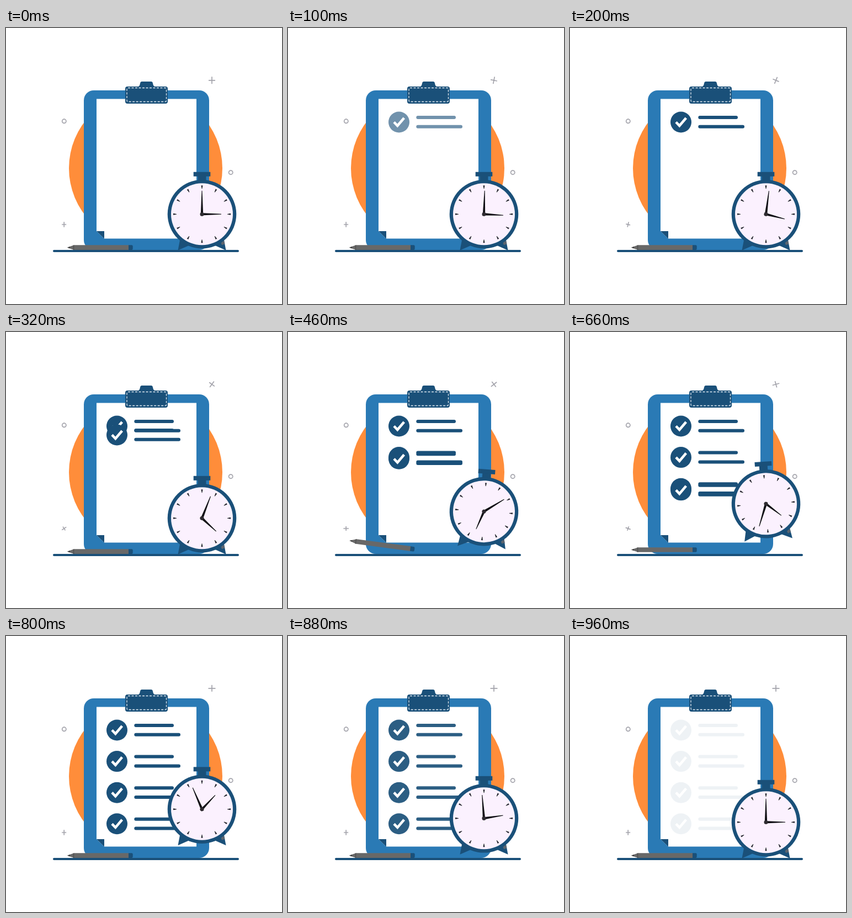
Animation of 500 by 500 pixels, one loop 0.98 s. Source, as an HTML page:

```html
<!DOCTYPE html>
<html lang="en">
<head>
<meta charset="utf-8">
<title>Checklist and clock</title>
<style>
  html, body { margin: 0; width: 100%; height: 100%; overflow: hidden; background: #fff; }
  svg { display: block; width: 100vw; height: 100vh; }
  .dark { fill: #1a5079; }
  .blue { fill: #2a7ab5; }
  .bar { stroke: #1a5079; stroke-width: 6; stroke-linecap: round; }
  .deco { fill: none; stroke: #a3a3ab; stroke-width: 1.7; }
</style>
</head>
<body>
<svg viewBox="0 0 500 500">
  <defs>
    <g id="task">
      <circle class="dark" cx="201" cy="170.5" r="19"/>
      <path d="M192 170.5l6.3 6.6L210.3 163" fill="none" stroke="#fff" stroke-width="4.6"/>
      <path class="bar" d="M235.3 162H301M235.3 178.8H313"/>
    </g>
  </defs>

  <circle cx="253" cy="254" r="139" fill="#ff8d3a"/>
  <circle class="deco" cx="105.3" cy="168.8" r="3.6"/>
  <circle class="deco" cx="407.2" cy="261.7" r="3.6"/>
  <path id="starA" class="deco" d="M-6 0H6M0 -6.5V6.5"/>
  <path id="starB" class="deco" stroke-width="1.4" d="M-4 0H4M0 -4.8V4.8"/>

  <rect class="blue" x="141" y="113" width="227" height="289" rx="18"/>
  <path d="M164 128.5H345V381.5H178L164 368Z" fill="#fff"/>
  <path class="dark" d="M164 368H178V381.5Z"/>

  <g id="tasks"></g>

  <path class="dark" d="M239 107L242 104L243.5 98.500Q244 97 246 97H263Q265 97 265.500 98.500L267 104L270 107Z"/>
  <rect class="dark" x="216" y="106" width="77" height="31" rx="4"/>
  <rect x="219" y="108.500" width="71.500" height="25" rx="2" fill="none" stroke="#dfe9f2" stroke-width="1.3" stroke-dasharray="4 2.500"/>

  <rect class="dark" x="85" y="402" width="337" height="4" rx="2"/>

  <g id="pen">
    <path d="M111 397.700L123 393.300H223V402H123Z" fill="#686868"/>
    <path d="M111 397.700L116 395.800V399.500Z" fill="#444"/>
    <path d="M122.500 393.500V402" stroke="#505050" stroke-width="1.500"/>
    <path class="dark" d="M222 393.300H227.500Q229.700 393.300 229.700 395.500V400Q229.700 402 227.500 402H222Z"/>
  </g>

  <g id="clock">
    <path class="dark" d="M-39 42L-43.500 65.500L-22 56ZM39 42L43.500 65.500L22 56Z"/>
    <path d="M34 51L40 48L41.500 54L36 56Z" fill="#5b6570"/>
    <rect class="dark" x="-7.500" y="-70" width="15" height="12"/>
    <rect class="dark" x="-15.300" y="-76.500" width="30.600" height="8"/>
    <circle class="dark" r="62.300"/>
    <circle r="56" fill="#fbf1fe"/>
    <g id="ticks" fill="#23242c"></g>
    <path id="hour" d="M-2.300 3L2.300 3L.5 -35H-.5Z" fill="#101014"/>
    <path id="minute" d="M-2.300 3L2.300 3L.5 -42.500H-.5Z" fill="#101014"/>
    <circle r="3.500" fill="#2e2b30"/>
  </g>
</svg>
<script>
const LOOP = 980;
const GAP = 56.6;
const STARTS = [265, 440, 640];
const SLIDE = 160;

const $ = id => document.getElementById(id);
const make = (tag, parent, attrs) => {
  const el = document.createElementNS('http://www.w3.org/2000/svg', tag);
  for (const k in attrs) el.setAttribute(k, attrs[k]);
  return parent.appendChild(el);
};
const place = (id, x, y, angle = 0) =>
  $(id).setAttribute('transform', `translate(${x} ${y}) rotate(${angle})`);

const clamp = v => Math.min(1, Math.max(0, v));
const ramp = (t, a, b) => clamp((t - a) / (b - a));
const ease = (t, a, b) => {
  const u = ramp(t, a, b);
  return u * u * (3 - 2 * u);
};

// Eased interpolation through [time, value] steps
function track(t, steps) {
  let v = steps[0][1];
  for (let i = 1; i < steps.length; i++) {
    const [a, from] = steps[i - 1], [b, to] = steps[i];
    v += (to - from) * ease(t, a, b);
  }
  return v;
}

// Bezier easing with control points (x1, 0) and (x2, 1)
function bezier(x, x1, x2) {
  let lo = 0, hi = 1;
  for (let i = 0; i < 24; i++) {
    const s = (lo + hi) / 2, r = 1 - s;
    if (3 * x1 * s * r * r + 3 * x2 * s * s * r + s * s * s < x) lo = s;
    else hi = s;
  }
  return lo * lo * (3 - 2 * lo);
}

const CLOCK_TILT = [[380, 0], [465, 4], [655, -4], [790, 0]];
const PEN_TILT = [[380, 0], [470, 7.8], [640, 0]];

for (let i = 0; i < 12; i++)
  make('path', $('ticks'), { d: 'M-1.5 -52H1.5L.4 -46H-.4Z', transform: `rotate(${i * 30})` });
const tasks = [0, 1, 2, 3].map(() => make('use', $('tasks'), { href: '#task' }));

function draw(t) {
  // Each task slides out from the one above it
  let y = 0;
  tasks.forEach((task, i) => {
    if (i) y += GAP * ease(t, STARTS[i - 1], STARTS[i - 1] + SLIDE);
    task.setAttribute('transform', `translate(0 ${y})`);
    task.style.display = i && t < STARTS[i - 1] ? 'none' : '';
  });
  $('tasks').setAttribute('opacity', ease(t, 20, 160) * (1 - ease(t, 860, LOOP)));

  const turn = bezier(clamp(t / 960), 0.935, 0.525);
  place('minute', 0, 0, 360 * turn);
  place('hour', 0, 0, 90 + 720 * turn);

  const up = 1 - (1 - ramp(t, 375, 700)) ** 2;
  const lift = 26.4 * up * (1 - ease(t, 765, 940));
  place('clock', 355, 337.3 - lift, track(t, CLOCK_TILT));

  const hop = 16 * Math.sin(Math.PI * ramp(t, 380, 680));
  $('pen').setAttribute('transform',
    `translate(0 ${-hop}) rotate(${track(t, PEN_TILT)} 170 397.7)`);

  place('starA', 373, 94.8, 90 * ramp(t, 0, 800));
  place('starB', 105.2, 356, 90 * (ease(t, 120, 460) + ease(t, 600, 800)));
}

const begin = performance.now();
function frame() {
  draw((performance.now() - begin) % LOOP);
  requestAnimationFrame(frame);
}
frame();
</script>
</body>
</html>
```
